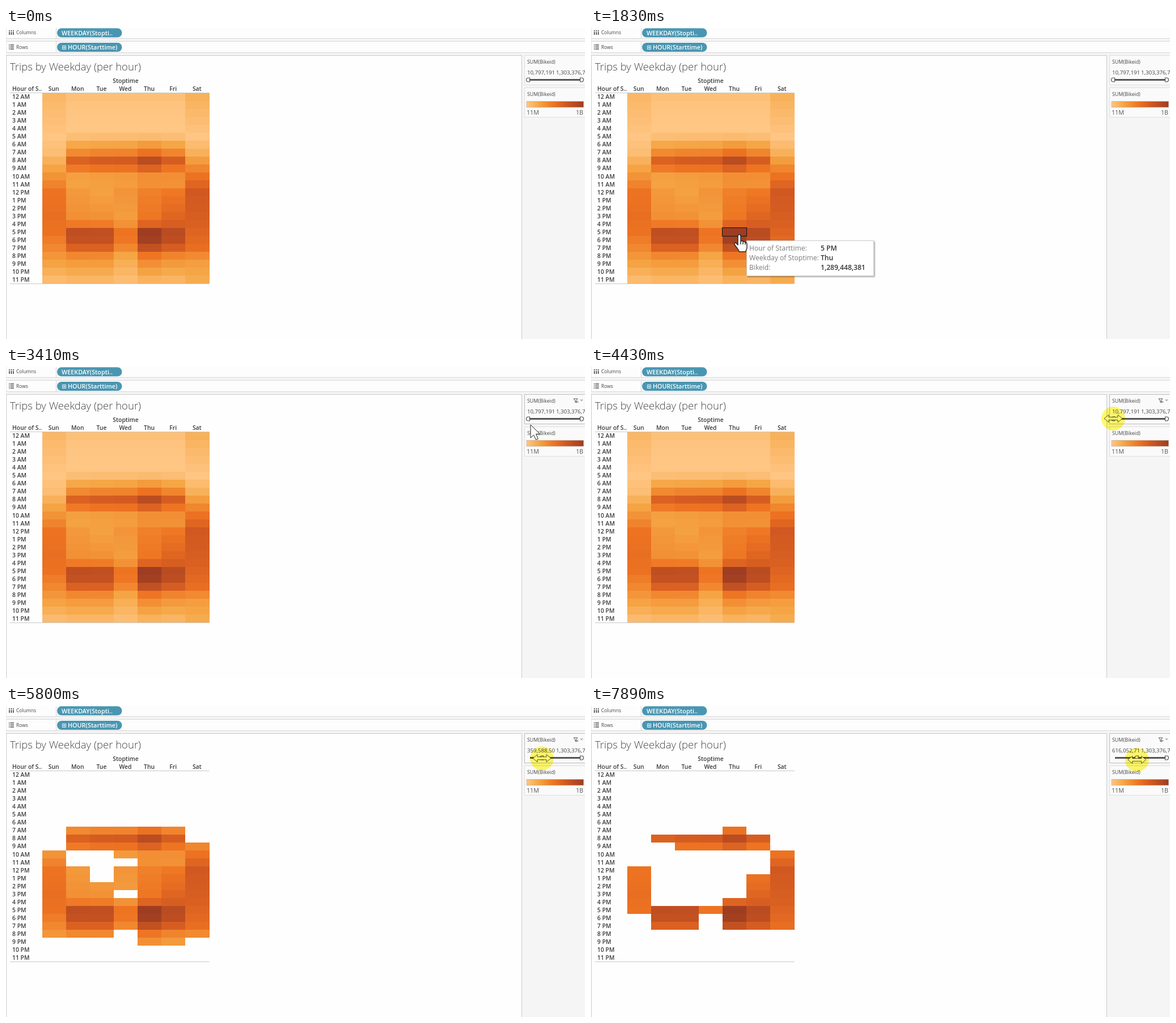
Recreate the animation shown at these times as an HTML page. Size 1021 by 549 pixels, loop 8000 ms.

```html
<!DOCTYPE html>
<html lang="en">
<head>
<meta charset="utf-8">
<title>Trips by Weekday</title>
<style>
  html, body { margin: 0; width: 100%; height: 100%; overflow: hidden; background: #f5f5f5; }
  svg { display: block; width: 1021px; height: 549px; font-family: "Open Sans", "Noto Sans", sans-serif; }
  text { white-space: pre; }
  .label { font-size: 10.4px; font-weight: 600; fill: #3a3a3a; }
  .small { font-size: 8.5px; fill: #444; }
  .card { font-size: 8.9px; fill: #444; }
  .num { font-size: 9.7px; fill: #444; }
  .legend { font-size: 10.7px; fill: #555; }
  .pill { font-size: 10.8px; font-weight: 600; fill: #fff; }
  .tip { font-size: 12.1px; fill: #7b7b7b; }
  .val { font-size: 12.1px; font-weight: 600; fill: #333; }
  .mid { text-anchor: middle; }
  .pointer { fill: #fff; stroke: #222; stroke-linejoin: round; }
</style>
</head>
<body>
<svg viewBox="0 0 1021 549">
  <defs>
    <linearGradient id="ramp"></linearGradient>
    <clipPath id="lowClip"><rect x="917" y="70" width="51" height="18"/></clipPath>
    <filter id="shadow" x="-5%" y="-10%" width="112%" height="130%">
      <feDropShadow dx="1.5" dy="1.5" stdDeviation="1.2" flood-opacity=".35"/>
    </filter>
  </defs>

  <!-- shelves -->
  <rect width="1021" height="549" fill="#f5f5f5"/>
  <path d="M0 -.5H1022V18.5H0zM0 23.5H1022V43.5H0z" fill="#fdfdfd" stroke="#d6d6d6"/>
  <path d="M88.5 0V18M88.5 24V43" stroke="#d6d6d6"/>
  <path d="M6 4v8M9.5 4v8M13 4v8" stroke="#444" stroke-width="1.6" stroke-dasharray="2 1 9"/>
  <path d="M5 30h9M5 33.5h9M5 37h9" stroke="#444" stroke-width="1.4" stroke-dasharray="1.5 1 9"/>
  <text class="small" x="18" y="11.3">Columns</text>
  <text class="small" x="18" y="36.5">Rows</text>
  <rect x="90" y=".5" width="114.500" height="16" rx="8" fill="#4996b2"/>
  <rect x="90" y="26" width="114.500" height="16" rx="8" fill="#4996b2"/>
  <text class="pill" x="98" y="12.7">WEEKDAY(Stopti..</text>
  <text class="pill" x="109" y="38">HOUR(Starttime)</text>
  <path d="M99.5 31.5h6v6h-6zM102.5 32.5v4M100.5 34.5h4" fill="none" stroke="#fff" stroke-width=".9"/>

  <!-- sheet -->
  <rect x=".5" y="48.5" width="909" height="510" fill="#fefefe" stroke="#c9c9c9"/>
  <text x="7" y="75" font-size="18.55" font-weight="300" fill="#444">Trips by Weekday (per hour)</text>
  <text class="label mid" x="211" y="97">Stoptime</text>
  <text class="label" x="11" y="111">Hour of S..</text>
  <path d="M7 114.5H358.500M7 451.5H358.500" stroke="#c8c8c8"/>
  <g id="heat" shape-rendering="crispEdges"></g>

  <!-- filter and legend -->
  <rect id="filterCard" x="914.5" y="48.5" width="120" height="52" fill="#fafafa"/>
  <rect x="914.5" y="105.5" width="120" height="52" fill="#fafafa" stroke="#dedede"/>
  <text class="card" x="919" y="62.5">SUM(Bikeid)</text>
  <g id="tools">
    <path d="M1001 56h7l-2.7 3.3v3.7l-1.6-1v-2.7zM1006 60l3 3m0-3l-3 3" fill="none" stroke="#555"/>
    <path d="M1012 57.5h6l-3 3z" fill="#aaa"/>
  </g>
  <g clip-path="url(#lowClip)"><text id="low" class="num" x="919" y="82"></text></g>
  <text class="num" x="970" y="82">1,303,376,740</text>
  <path d="M924 91.5H1012" stroke="#555" stroke-width="3"/>
  <g fill="#fafafa" stroke="#555" stroke-width="1.2">
    <path id="handle" d="M2.5 -3.5V3.5H0A3.5 3.5 0 0 1 0 -3.5z"/>
    <path d="M1012.5 88v7h2.5a3.5 3.5 0 0 0 0 -7z"/>
  </g>
  <text class="card" x="919" y="119.5">SUM(Bikeid)</text>
  <rect x="918" y="129.5" width="100.5" height="10.5" fill="url(#ramp)" stroke="#b9a89a" stroke-width=".6"/>
  <text class="legend" x="918" y="153">11M</text>
  <text class="legend" x="1018" y="153" text-anchor="end">1B</text>

  <!-- hover -->
  <rect id="outline" width="43" height="15" fill="none" stroke="#111"/>
  <g id="tooltip">
    <rect x=".5" y=".5" width="224" height="62" fill="#fff" stroke="#ccc" filter="url(#shadow)"/>
    <text class="tip" x="5" y="18">Hour of Starttime:</text>
    <text class="tip" x="5" y="35">Weekday of Stoptime:</text>
    <text class="tip" x="5" y="52">Bikeid:</text>
    <text class="val" x="131" y="18"></text>
    <text class="val" x="131" y="35"></text>
    <text class="val" x="131" y="52"></text>
  </g>
  <path id="arrow" class="pointer" d="M.5 .5V23.500L6 18.500L10 27L13.800 25.200L10 16.800H17z"/>
  <path id="hand" class="pointer" stroke-width="1.4" d="M-3 3a2.500 2.500 0 0 1 5 0v10c1-2 4-1.500 4 .5c1.500-1 4-.5 4 1.500c1.500-.6 3 .3 3 2v7c0 3-2 4-2.500 7h-11c-.5-3-3-5-5-8l-3.500-5c-1-2 1.500-3.500 3-2l3 3zM2 13v5M6 14v4M10 15.500v3"/>
  <path id="resize" class="pointer" stroke-opacity=".75" d="M-16 0L-8 -6.500V-2.500H8V-6.500L16 0L8 6.500V2.500H-8V6.500z"/>
  <circle id="click" r="21" fill="#fff96c" style="mix-blend-mode:multiply"/>
</svg>

<script>
const LOOP = 8000, STEP = 70;
const MIN = 10797191, MAX = 1303376740;
const $ = id => document.getElementById(id);
const heat = $('heat');

// linear lookup between key points [key, ...values], optionally in steps
function lookup(keys, key, step = 0) {
  if (key <= keys[0][0]) return keys[0].slice(1);
  const i = keys.findIndex(r => r[0] > key);
  if (i < 0) return keys[keys.length - 1].slice(1);
  const a = keys[i - 1], b = keys[i];
  let gone = key - a[0];
  if (step) gone = Math.floor(gone / step) * step;
  const k = gone / (b[0] - a[0]);
  return a.slice(1).map((v, n) => v + (b[n + 1] - v) * k);
}

// working day, in millions: morning rush, lunch, afternoon, evening rush
const workday = (am, noon, lunch, aft, pm) => [
  [0, 65], [1, 35], [4, 14], [5, .1 * am], [6, .33 * am], [7, .59 * am], [8, am], [9, .73 * am],
  [10, noon], [11, .96 * noon], [12, lunch], [15, aft], [16, aft + .25 * (pm - aft)],
  [17, pm], [18, .97 * pm], [19, .78 * pm], [20, .47 * pm], [21, .335 * pm], [23, .14 * pm]
];
const week = {
  Sun: [[0, 140], [5, 20], [7, 85], [12, 625], [15, 675], [17, 640], [19, 490], [23, 110]],
  Mon: workday(800, 325, 370, 430, 1042),
  Tue: workday(860, 345, 315, 420, 1035),
  Wed: workday(880, 365, 400, 345, 622),
  Thu: workday(1085, 445, 540, 600, 1300),
  Fri: workday(850, 440, 590, 760, 1085),
  Sat: [[0, 190], [5, 20], [7, 190], [9, 500], [12, 900], [16, 820], [19, 680], [20, 470], [21, 335], [23, 240]]
};
const days = Object.keys(week);

const stops = [
  [0, 255, 198, 133], [.21, 245, 166, 69], [.47, 238, 116, 34],
  [.68, 210, 89, 33], [1, 158, 61, 34]
];
const rgb = c => `rgb(${c.map(Math.round)})`;

function add(parent, tag, attrs, text = '') {
  const el = document.createElementNS('http://www.w3.org/2000/svg', tag);
  for (const k in attrs) el.setAttribute(k, attrs[k]);
  el.textContent = text;
  return parent.appendChild(el);
}

for (const [at, ...c] of stops) add($('ramp'), 'stop', { offset: at, 'stop-color': rgb(c) });

const left = d => Math.round(63.7 + 42.12 * d);
const rowTop = h => 115 + 14 * h;
const hourName = h => `${h % 12 || 12} ${h < 12 ? 'AM' : 'PM'}`;
const cells = [];
days.forEach((name, d) => add(heat, 'text', { class: 'label mid', x: 84.2 + 42.1 * d, y: 111 }, name));
for (let h = 0; h < 24; h++) {
  add(heat, 'text', { class: 'label', x: 11, y: 125 + 14.05 * h }, hourName(h));
  days.forEach((name, d) => {
    const [value] = lookup(week[name], h);
    const el = add(heat, 'rect', {
      x: left(d), y: rowTop(h), width: left(d + 1) - left(d), height: 14,
      fill: rgb(lookup(stops, (value - 11) / 1292))
    });
    cells.push({ el, value });
  });
}

// pointer: [time, x, y]
const path = [
  [590, 865, 520], [730, 695, 409], [930, 620, 403], [1140, 372, 384], [1270, 372, 384],
  [1410, 299, 384], [1620, 262, 364], [2440, 262, 364], [2510, 627, 277], [2650, 844, 242],
  [2850, 844, 242], [3200, 928, 112], [3620, 921, 91]
];
// lower bound of the filter: [time, value]
const drag = [
  [4750, MIN], [5800, 359588500], [6070, 428e6], [6330, 428e6], [6540, 482691320],
  [7080, 562e6], [7340, 562e6], [7620, 584e6], [7820, 584e6], [7890, 616052710]
];
// [start, end, hour, day, value]
const hovers = [
  [1410, 1550, 19, 5, '761,204,593'],
  [1550, 2510, 17, 4, '1,289,448,381']
];

const show = (el, on) => { el.style.display = on ? '' : 'none'; };
const move = (el, x, y) => el.setAttribute('transform', `translate(${x} ${y})`);
const fields = document.querySelectorAll('.val');

function draw(t) {
  const [bound] = lookup(drag, t, STEP);
  const share = (bound - MIN) / (MAX - MIN);
  const handleX = 921 + 89 * share;
  for (const c of cells) show(c.el, bound === MIN || c.value * 1e6 >= bound);
  $('low').textContent = Math.round(bound).toLocaleString('en-US');
  move($('handle'), handleX, 91.5);

  const pressed = t >= 4360;
  const [x, y] = pressed ? [handleX, 91 + 18 * share * share] : lookup(path, t, STEP);
  const kind = t < 590 ? '' : t >= 3620 ? 'resize' : t >= 1410 && t < 2510 ? 'hand' : 'arrow';
  for (const id of ['arrow', 'hand', 'resize']) {
    show($(id), id === kind);
    move($(id), x, y);
  }
  show($('click'), pressed);
  move($('click'), x, y);

  const over = t >= 3200;
  show($('tools'), over);
  $('filterCard').setAttribute('stroke', over ? '#bdbdbd' : '#dedede');

  const hover = hovers.find(h => t >= h[0] && t < h[1]);
  show($('tooltip'), hover);
  show($('outline'), hover);
  if (hover) {
    const [, , h, d, value] = hover;
    move($('outline'), left(d) - .5, rowTop(h) - .5);
    move($('tooltip'), x + 12, y + 11);
    [hourName(h), days[d], value].forEach((s, i) => { fields[i].textContent = s; });
  }
}

const start = performance.now();
function tick() {
  draw((performance.now() - start) % LOOP);
  requestAnimationFrame(tick);
}
tick();
</script>
</body>
</html>
```
